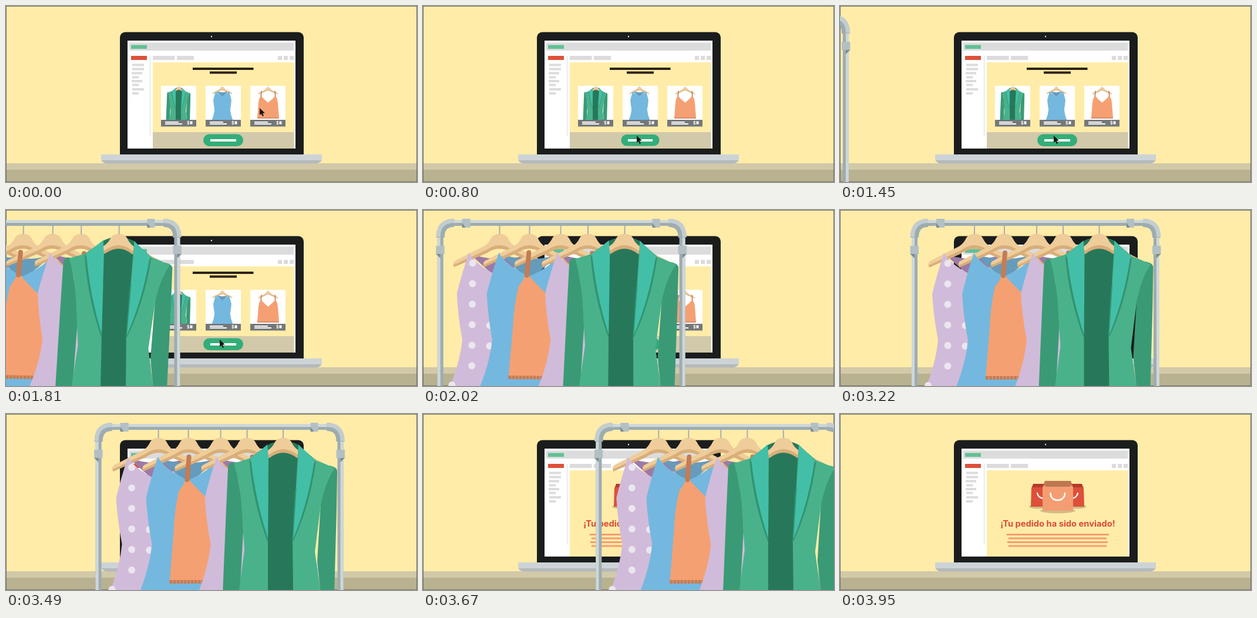
These frames come from a looping animation (700x300 px, 5.95 s). An HTML page:

```html
<!DOCTYPE html>
<html lang="es">
<head>
<meta charset="utf-8">
<title>Tu pedido</title>
<style>
  html, body { margin: 0; height: 100%; overflow: hidden; background: #ffeca8; }
  svg { display: block; width: 100vw; height: 100vh; }
  text { font-family: Inter, Lato, sans-serif; font-weight: 700; }
  .lilac { color: #d1bbda; --back: #9d7aa6; }
  .blue { color: #74b8df; --back: #679bbb; }
</style>
</head>
<body>
<svg viewBox="0 0 700 300">
  <defs>
    <!-- Garments hang from x = 0 -->
    <g id="hanger">
      <path d="M0 27V42" stroke="#a9aeac" stroke-width="2"/>
      <path d="M-77 98Q-81 90-73 86L-26 62Q-18 57-14 48Q-10 41 0 41Q10 41 14 48Q18 57 26 62L73 86Q81 90 77 98L22 74Q0 58-22 74Z" fill="#d8ae79"/>
      <path d="M-77 94Q-80 89-73 86L-26 62Q-18 57-14 48Q-10 41 0 41Q10 41 14 48Q18 57 26 62L73 86Q80 89 77 94L22 68Q0 52-22 68Z" fill="#efcd9a"/>
    </g>
    <g id="dress">
      <path d="M-51 75Q0 92 51 75L0 120Z" fill="var(--back)"/>
      <use href="#hanger"/>
      <path d="M-52 73Q-64 110-72 143Q-70 180-62 222Q-66 262-84 306H84Q66 262 62 222Q70 180 72 143Q64 110 52 73Q40 95 0 113Q-40 95-52 73Z" fill="currentColor"/>
    </g>
    <g id="dotted">
      <use href="#dress"/>
      <path d="M-45.500 91V300M-15.500 197V240M-79 299v.1" fill="none" stroke="#ebe6ee" stroke-width="12" stroke-linecap="round" stroke-dasharray="0 35"/>
    </g>
    <g id="top">
      <use href="#hanger"/>
      <path d="M-58 107Q-62 120-71 131Q-79 165-80 200L-87 288H87L80 200Q79 165 71 131Q62 120 58 107Q36 134 0 163Q-36 134-58 107Z" fill="#f5a072"/>
      <path d="M-54 73L-57 112M54 73L57 112" stroke="#c47c54" stroke-width="8" stroke-linecap="round"/>
      <path d="M-87 286H87" stroke="#c47c54" stroke-width="6" stroke-dasharray="5 1"/>
    </g>
    <g id="jacket">
      <path d="M-27 53Q0 39 27 53L26 306H-27Z" fill="#27785a"/>
      <use href="#hanger"/>
      <path d="M-82 83Q-93 81-94 92L-97 160L-103 306H-74L-68 200L-70 150ZM78 88Q92 90 92 98L91 160L87 306H64L58 250L64 150Z" fill="#3a9a76"/>
      <path d="M-27 53L-58 76L-84 84Q-74 115-71 155L-66 232L-76 306H-26V218ZM26 53L56 79L88 92Q72 115 64 155L54 235L64 306H17L16 218Z" fill="#49b28a"/>
      <path d="M-58 76Q-52 150-26 219L-25 130ZM56 79Q45 160 15 221L20 130Z" fill="#329370"/>
      <path d="M-27 52L-55 76Q-48 145-26 212L-25 75ZM26 52L53 79Q43 150 17 213L26 76Z" fill="#43bfa8"/>
    </g>
    <g id="tag">
      <path d="M0 194h60v11.500H0z" fill="#757879"/>
      <path d="M7 198h23M7 201h29" stroke="#fff" stroke-width="1.800"/>
      <text x="44" y="201.500" font-size="7" fill="#fff">$</text>
      <path d="M49.500 196.500h4v5h-4z" fill="#fff"/>
    </g>
    <g id="sideBag">
      <ellipse cx="337" cy="158" rx="15" ry="3.500" fill="#cdbd86"/>
      <path d="M329 119H348V127H326Z" fill="#b33b2b"/>
      <path d="M326 125H350V158H325Z" fill="#dd5039"/>
      <path d="M336 135Q338 143 346 144" fill="none" stroke="#fff" stroke-width="2.300" stroke-linecap="round"/>
    </g>
  </defs>

  <rect width="700" height="300" fill="#ffeca8"/>
  <path d="M0 268H700V279H0z" fill="#d2c9a9"/>
  <path d="M0 279H700V300H0z" fill="#b8b291"/>
  <rect x=".5" y=".5" width="699" height="299" fill="none" stroke="#77725e"/>

  <!-- Laptop -->
  <rect x="194" y="44.500" width="313" height="220" rx="9" fill="#1b1d1d"/>
  <circle cx="350" cy="52" r="1.200" fill="#e8e8e8"/>
  <path d="M162 262H538Q535 268.500 527 268.500H173Q165 268.500 162 262" fill="#b4b9bb"/>
  <path d="M162 253H538V263H162z" fill="#cdd3d6"/>
  <path d="M207 59H493V243H207z" fill="#fff"/>
  <path d="M210 62.500H490V76H210zM250 85H287.500V92H250zM291 85H320V92H291zM463 85h7v7h-7zM473 85h7v7h-7zM483 85h7v7h-7zM245 85h1v136h-1z" fill="#dcdcdc"/>
  <path d="M215 100.500h20M215 107.500h20M214 114.500h18M215 121.500h11M214 128h18M215 134.500h11M215 142h20M215 149h11" stroke="#dcdcdc" stroke-width="4"/>
  <path d="M213 66.500h27V73h-27z" fill="#63bf95"/>
  <path d="M213 85h27v7h-27z" fill="#dd5238"/>
  <path d="M250 96H490.500V243H250z" fill="#ffeca8"/>

  <g id="shop">
    <path d="M250 215H490.500V243H250z" fill="#d1c9a9"/>
    <path d="M318 107H421.500M347 113.500H393" stroke="#2d2314" stroke-width="4.200"/>
    <path d="M264 136h60v69h-60zM340 136h60v69h-60zM416 136h60v69h-60z" fill="#fff"/>
    <use href="#jacket" transform="translate(294.500 129) scale(.214)"/>
    <use href="#dress" class="blue" transform="translate(368.500 129.300) scale(.214)"/>
    <use href="#top" transform="translate(446.500 129.800) scale(.214)"/>
    <use href="#tag" x="264"/><use href="#tag" x="340"/><use href="#tag" x="416"/>
    <g id="button">
      <rect x="336" y="218.500" width="68" height="20.500" rx="10.250" fill="#33ad79"/>
      <path d="M348 229h44" stroke="#fff" stroke-width="4"/>
    </g>
    <path id="cursor" d="M0 0V12L2.800 9.600L4.800 14L7 13L5 8.800L8.800 8.400Z" fill="#141414"/>
  </g>

  <g id="done">
    <use href="#sideBag"/>
    <use href="#sideBag" transform="matrix(-1 0 0 1 741 0)"/>
    <ellipse cx="371" cy="165" rx="30" ry="4.200" fill="#cdbd86"/>
    <path d="M349 114H393L397 125H345Z" fill="#bd7852"/>
    <path d="M345 124L350 121.500V124H392V121.500L397 124V165H345Z" fill="#f59d72"/>
    <path d="M358.500 135C358.500 151 383 151 383 135" fill="none" stroke="#fff" stroke-width="2.500" stroke-linecap="round"/>
    <text x="371" y="191.500" font-size="14.700" text-anchor="middle" fill="#dd4a36">¡Tu pedido ha sido enviado!</text>
    <path d="M285 205.500H457M288 212H453M286 218.500H455M288 225H453" stroke="#f59d72" stroke-width="3" stroke-linecap="round"/>
  </g>

  <!-- Clothes rack -->
  <g id="rack">
    <g fill="none">
      <path d="M127 300V50Q127 22 155 22H511Q539 22 539 50V300" stroke="#9dacb0" stroke-width="10"/>
      <path d="M124.500 300V50Q124.500 19.500 155 19.500H511Q541.500 19.500 541.500 50V300" stroke="#ced7d9" stroke-width="5"/>
      <path d="M127 47Q127 22 150 22M539 47Q539 22 516 22" stroke="#9dacb0" stroke-width="14"/>
      <path d="M123.500 46Q123.500 18.500 150 18.500M542.500 46Q542.500 18.500 516 18.500" stroke="#c3cdd0" stroke-width="7"/>
    </g>
    <path d="M119.500 61h14.500v14h-14.500zM532 61h14.500v14h-14.500zM164 15h14v15h-14zM488 15h13v15h-13z" fill="#b3c0c3"/>
    <path d="M164 22L170 30H164zM488 22L494 30H488zM119.500 75L127 82V75zM546.500 75L539 82V75z" fill="#7d8c90"/>
    <g id="clothes">
      <use href="#dotted" class="lilac"/>
      <use href="#dress" class="blue"/>
      <use href="#top"/>
      <use href="#dress" class="lilac"/>
      <use href="#jacket"/>
    </g>
  </g>
</svg>
<script>
const LOOP = 5950;
const hooks = [229, 280, 335, 380, 441.5];
const lags = [.01, .01, .03, .016, .004];
const el = id => document.getElementById(id);
const [shop, done, button, cursor, rack] = ['shop', 'done', 'button', 'cursor', 'rack'].map(el);
const clothes = [...el('clothes').children];

const clamp = x => Math.min(1, Math.max(0, x));
const ease = x => (1 - Math.cos(Math.PI * clamp(x))) / 2;
const show = (node, on) => node.setAttribute('visibility', on ? 'visible' : 'hidden');
const move = (node, value) => node.setAttribute('transform', value);

// Horizontal distance of the rack from its resting place
function rackShift(t) {
  if (t < 3200) return -652 * (1 - ease((t - 1098) / 1235));
  return 387 * ((Math.min(t, 3850) - 3200) / 590) ** 3.59;
}

function draw(t) {
  const glide = ease(t / 610);
  move(cursor, `translate(${432 - 68 * glide} ${174 + 47 * glide})`);

  const press = 1 - .07 * Math.sin(Math.PI * clamp((t - 770) / 150));
  move(button, `translate(370 228.75) scale(${press}) translate(-370 -228.75)`);

  show(shop, t < 2400);
  show(done, t >= 2400);
  show(rack, t > 1400 && t < 3950);

  const shift = rackShift(t);
  const behind = Math.min(0, shift);
  const wobble = .25 * Math.sin((t - 2260) / 100) * clamp((2950 - t) / 690) * (t > 2260);
  const angle = 1.2 * clamp(-behind / 240) + wobble;
  move(rack, `translate(${shift})`);
  clothes.forEach((item, i) =>
    move(item, `translate(${hooks[i] + behind * lags[i]}) rotate(${angle} 0 22)`));
}

const start = performance.now();
function tick() {
  draw((performance.now() - start) % LOOP);
  requestAnimationFrame(tick);
}
tick();
</script>
</body>
</html>
```
